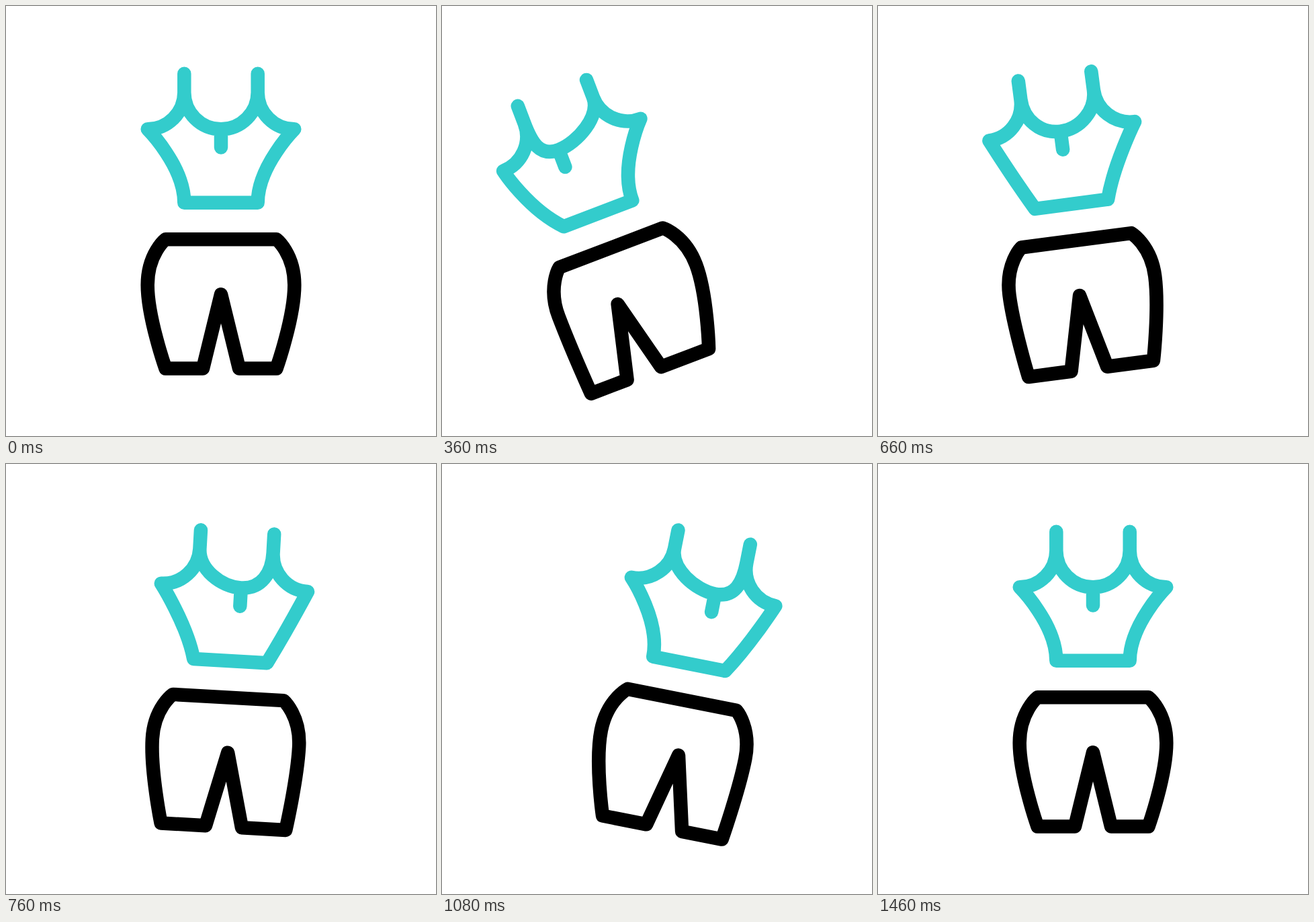
These frames come from a looping animation (640 px wide and 640 px high, 2.4 s). An HTML page:

```html
<!DOCTYPE html>
<html lang="en">
<head>
<meta charset="utf-8">
<title>Sportswear</title>
<style>
  html, body { margin: 0; width: 100%; height: 100%; overflow: hidden; background: #fff; }
  svg { display: block; width: 100vw; height: 100vh; }
  path { fill: none; stroke-width: 20.5; stroke-linecap: round; stroke-linejoin: round; }
  #top { stroke: #33cccc; }
  #shorts { stroke: #000; }
</style>
</head>
<body>
<svg viewBox="0 0 640 640">
  <g id="outfit">
    <path id="top"/>
    <path id="shorts"/>
  </g>
</svg>
<script>
  const LOOP = 2400;
  const SWING = [0, 438, 938, 1466];
  const SHIFT = [0, 415, 938, 1466];
  const outfit = document.getElementById('outfit');
  const topPath = document.getElementById('top');
  const shortsPath = document.getElementById('shorts');

  const ease = u => u * u * (3 - 2 * u);

  // Eased value through rest, left pose, right pose, rest
  function track(t, times, left, right, rest = 0) {
    const values = [rest, left, right, rest];
    for (let i = 0; i < 3; i++) {
      if (t < times[i + 1]) {
        const u = (t - times[i]) / (times[i + 1] - times[i]);
        return values[i] + (values[i + 1] - values[i]) * ease(u);
      }
    }
    return rest;
  }

  // Coordinates are relative to the pivot at the hem of the shorts
  function drawTop(neck, leftBend, rightBend) {
    const strap = s => `M${s * 54.7} -438.8V-411`;
    const wing = s => `C${s * 54.7} -380.8 ${s * 79.1} -356.2 ${s * 109.3} -356.2`;
    const side = (s, [x, y]) =>
      `C${s * 109.3} -356.2 ${s * (54.7 + x)} ${-246.8 - y} ${s * 54.7} -246.8`;
    return strap(-1) + wing(-1) + side(-1, leftBend) + 'H54.7' +
      strap(1) + wing(1) + side(1, rightBend) +
      `M-54.7 -411C-54.7 -380.8 ${neck - 30.2} -356.2 ${neck} -356.2` +
      `S54.7 -380.8 54.7 -411M${neck} -356.2V-328.9`;
  }

  function drawShorts(crotch, left, right) {
    return `M${left} 0C${left} 0 -109.3 -76 -109.3 -124.3` +
      'C-109.3 -171 -82.5 -192.3 -82.5 -192.3H82.5' +
      'C82.5 -192.3 109.3 -171 109.3 -124.3' +
      `C109.3 -76 ${right} 0 ${right} 0` +
      `H${crotch + 27}L${crotch} -110.2L${crotch - 27} 0Z`;
  }

  function render() {
    const t = performance.now() % LOOP;
    const swing = (left, right, rest) => track(t, SWING, left, right, rest);
    const shift = (left, right) => track(t, SHIFT, left, right);

    outfit.setAttribute('transform',
      `translate(320 539.5) rotate(${swing(-22.7, 13.65)})`);
    topPath.setAttribute('d', drawTop(
      shift(-22, 21.5),
      [swing(44, 0), swing(42, 54.5, 54.5)],
      [swing(0, 36), swing(54.5, 45, 54.5)]
    ));
    shortsPath.setAttribute('d', drawShorts(
      shift(-21.5, 13.2),
      swing(-107, -82.5, -82.5),
      swing(82.5, 102, 82.5)
    ));
    requestAnimationFrame(render);
  }
  render();
</script>
</body>
</html>
```
